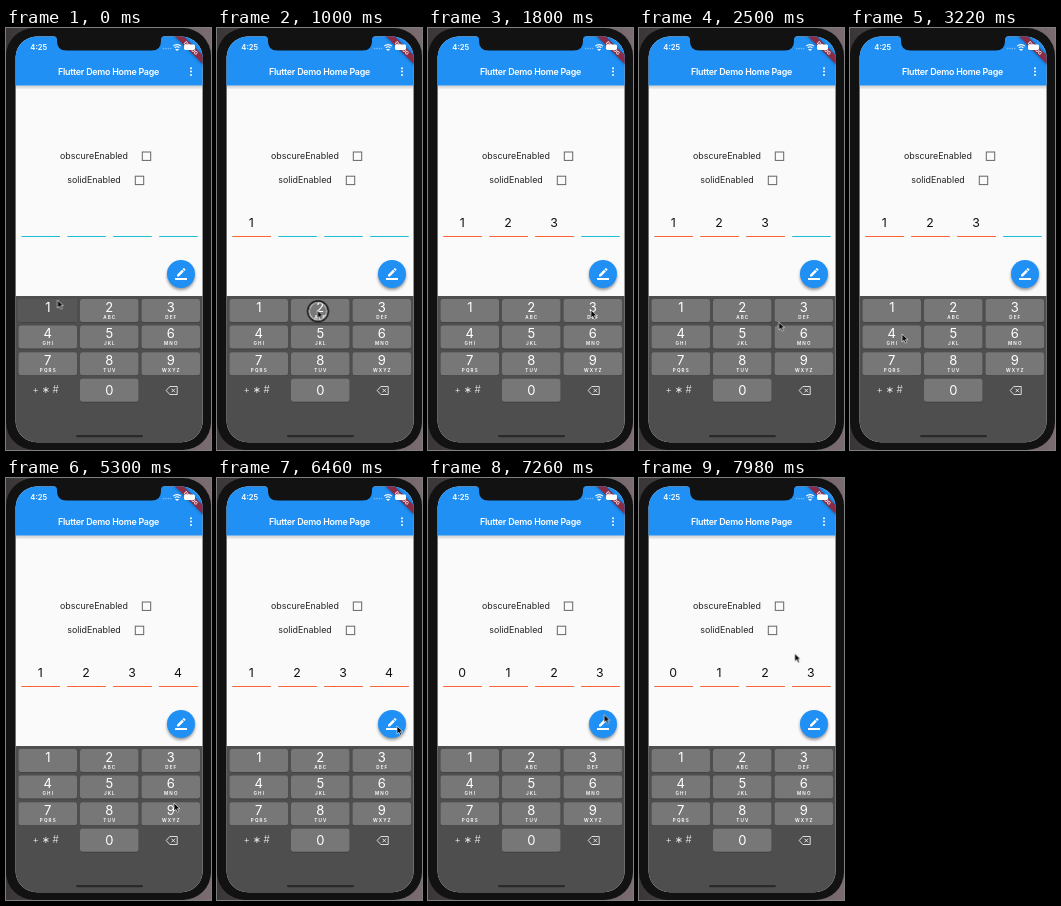
Write an HTML page that moves like this. It is 205x422 px and loops after 8 s.

```html
<!DOCTYPE html>
<html lang="en">
<head>
<meta charset="utf-8">
<title>Pin input demo</title>
<style>
  html, body { margin: 0; width: 100%; height: 100%; overflow: hidden; background: #111; }
  svg { display: block; width: 100vw; height: 100vh; }
  text { font-family: Inter, Roboto, sans-serif; text-anchor: middle; }
  .label { font-size: 8.9px; fill: #222; }
  .digit { font-size: 12.3px; fill: #111; }
  .num { font-size: 13px; fill: #fff; }
  .abc { font-size: 4.6px; font-weight: 600; letter-spacing: 1.1px; fill: #fff; }
  .box { fill: none; stroke: #666; stroke-width: 1; }

  .cell, .press, .old, .new, #ring { animation: 8s step-end infinite; }
  .press { animation-timing-function: linear; }
  #cursor { animation: move 8s ease-in-out infinite; }
  #ring { animation-name: ring; }
  .old { animation-name: old; }
  .new { animation-name: new; }
  #c1 { animation-name: c1; }
  #c2 { animation-name: c2; }
  #c3 { animation-name: c3; }
  #c4 { animation-name: c4; }
  #p1 { animation-name: p1; }
  #p2 { animation-name: p2; }
  #p3 { animation-name: p3; }
  #p4 { animation-name: p4; }

  @keyframes c1 { 0% { opacity: 0 } .5%, 100% { opacity: 1 } }
  @keyframes c2 { 0% { opacity: 0 } 14%, 100% { opacity: 1 } }
  @keyframes c3 { 0% { opacity: 0 } 19.25%, 100% { opacity: 1 } }
  @keyframes c4 { 0% { opacity: 0 } 45%, 100% { opacity: 1 } }
  @keyframes old { 0% { opacity: 1 } 85%, 100% { opacity: 0 } }
  @keyframes new { 0% { opacity: 0 } 85%, 100% { opacity: 1 } }

  @keyframes p1 { 0% { opacity: 1 } 2.5%, 100% { opacity: 0 } }
  @keyframes p2 { 0%, 13.6% { opacity: 0 } 13.7%, 14.2% { opacity: 1 } 16%, 100% { opacity: 0 } }
  @keyframes p3 { 0%, 18.9% { opacity: 0 } 19%, 19.5% { opacity: 1 } 21.5%, 100% { opacity: 0 } }
  @keyframes p4 { 0%, 44.4% { opacity: 0 } 44.5%, 45.2% { opacity: 1 } 47.5%, 100% { opacity: 0 } }

  @keyframes ring {
    0%, 13.9%, 19%, 44.75%, 84.75%, 100% { opacity: 0 }
    11%, 17.25%, 42.25%, 83.25% { opacity: 1 }
  }
  @keyframes move {
    0%, 2.5% { transform: translate(51.5px, 272px) }
    10.5% { transform: translate(98px, 281.5px) }
    12.5%, 14.25% { transform: translate(100.5px, 282.3px) }
    17%, 20.5% { transform: translate(165px, 281px) }
    30% { transform: translate(142.5px, 291.5px); animation-timing-function: linear }
    31.25% { transform: translate(139.7px, 294px) }
    40.5% { transform: translate(52px, 306px) }
    42%, 50% { transform: translate(50px, 307px); animation-timing-function: ease-in }
    57.5% { transform: translate(92px, 318px); animation-timing-function: linear }
    63% { transform: translate(140px, 333px); animation-timing-function: ease-out }
    66.25% { transform: translate(168px, 325px) }
    68% { transform: translate(170px, 322px) }
    77.25%, 88% { transform: translate(180px, 248px) }
    98%, 100% { transform: translate(155.7px, 175.5px) }
  }
</style>
</head>
<body>
<svg viewBox="0 0 205 422" preserveAspectRatio="none">
  <defs>
    <clipPath id="screen"><rect x="9.6" y="8.6" width="187" height="405.6" rx="21"/></clipPath>
    <filter id="soft" x="-50%" y="-50%" width="200%" height="200%"><feGaussianBlur stdDeviation="1.8"/></filter>
    <linearGradient id="desk"><stop stop-color="#3a3637"/><stop offset="1" stop-color="#7a6c70"/></linearGradient>
  </defs>

  <rect width="205" height="422" fill="url(#desk)"/>
  <rect width="205" height="422" rx="28" fill="#121212"/>

  <g clip-path="url(#screen)">
    <rect x="9" y="8" width="188" height="407" fill="#fafafa"/>
    <rect x="9" y="57" width="188" height="2.5" fill="#000" opacity=".22" filter="url(#soft)"/>
    <rect x="9" y="8" width="188" height="49.5" fill="#2090f4"/>
    <text x="102.5" y="47.3" font-size="8.9" font-weight="600" letter-spacing="-.25" fill="#fff">Flutter Demo Home Page</text>
    <g fill="#fff"><circle cx="185" cy="40.2" r="1"/><circle cx="185" cy="43.6" r="1"/><circle cx="185" cy="47" r="1"/></g>
    <g transform="translate(197 8) rotate(45)">
      <rect x="-24" y="14" width="48" height="6.2" fill="#000" opacity=".4" filter="url(#soft)"/>
      <rect x="-24" y="14" width="48" height="6" fill="#8a2c46"/>
      <text y="18.8" font-size="5" font-weight="800" fill="#f0dde2">DEBUG</text>
    </g>

    <text x="32.8" y="21.8" font-size="7.6" font-weight="600" fill="#fff">4:25</text>
    <g fill="#fff" opacity=".4">
      <circle cx="157.6" cy="20.6" r=".8"/><circle cx="160" cy="20.6" r=".8"/>
      <circle cx="162.4" cy="20.6" r=".8"/><circle cx="164.8" cy="20.6" r=".8"/>
    </g>
    <g fill="none" stroke="#fff" stroke-width="1.1">
      <path d="M167.3 18.2a5.4 5.4 0 0 1 7.6 0M168.8 19.9a3.3 3.3 0 0 1 4.6 0"/>
      <path d="M170.3 21.5h1.6l-.8.8z"/>
    </g>
    <rect x="178" y="16.6" width="11" height="5.4" rx="1.4" fill="#fff"/>

    <text class="label" x="88" y="131.2">obscureEnabled</text>
    <rect class="box" x="136.300" y="124" width="8.400" height="8.400"/>
    <text class="label" x="88" y="155.4">solidEnabled</text>
    <rect class="box" x="129.300" y="148.200" width="8.400" height="8.400"/>

    <g id="cells"></g>

    <circle cx="175" cy="248" r="14" fill="#000" opacity=".4" filter="url(#soft)"/>
    <circle cx="175" cy="246" r="14" fill="#2090f4"/>
    <path transform="translate(169 240) scale(.5)" fill="#fff" d="M17.75 7 14 3.25l-10 10V17h3.75zM20.7 4c.4-.4.4-1 0-1.4L18.4.3c-.4-.4-1-.4-1.4 0l-2 2L18.75 6zM0 20h24v4H0z"/>

    <rect x="9" y="268" width="188" height="147" fill="#4e4e4e"/>
    <g id="keys"></g>
    <text x="41" y="365" font-size="9.8" font-weight="300" letter-spacing="2.7" fill="#eee">+∗#</text>
    <g fill="none" stroke="#fff" stroke-width=".8" stroke-linejoin="round">
      <path d="M160.2 362.5l3.6-4h7.4v8h-7.4z"/>
      <path d="M165.5 360.7l3.6 3.6m0-3.6l-3.6 3.6"/>
    </g>
    <rect x="70" y="407" width="67" height="2.2" rx="1.1" fill="#2a2a2a"/>
  </g>
  <path d="M48 8q3 .5 3 3.500v1.700q0 9.300 9.300 9.300h85.400q9.300 0 9.300-9.300v-1.700q0-3 3-3.500z" fill="#121212"/>

  <g id="cursor">
    <g id="ring" fill="none">
      <circle cx=".5" cy="1" r="9" stroke="#fff" stroke-width="1.2" opacity=".85"/>
      <circle cx=".5" cy="1" r="10.200" stroke="#0a0a0a" stroke-width="1.500"/>
    </g>
    <path d="M0 0v8l1.900-1.700 1.300 2.900 1.500-.7-1.300-2.800h2.500z" fill="#0a0a0a" stroke="#fff" stroke-width=".6"/>
  </g>
</svg>
<script>
  const letters = ['', 'ABC', 'DEF', 'GHI', 'JKL', 'MNO', 'PQRS', 'TUV', 'WXYZ'];

  function key(n, col, row) {
    const x = 12.5 + col * 61.5, y = 271 + row * 26.6, mid = x + 29.3;
    const abc = letters[n - 1];
    const rect = (fill, extra = '', dy = 0) =>
      `<rect ${extra} x="${x}" y="${y + dy}" width="58.5" height="23" rx="2.5" fill="${fill}"/>`;
    return rect('#3a3a3a', '', .6) + rect('#777')
      + (n > 0 && n < 5 ? rect('#575757', `class="press" id="p${n}"`) : '')
      + `<text class="num" x="${mid}" y="${y + (n ? 12.5 : 16)}">${n}</text>`
      + (abc ? `<text class="abc" x="${mid + .5}" y="${y + 19.8}">${abc}</text>` : '');
  }

  function cell(i) {
    const x = 15.5 + i * 45.9, mid = x + 18.7;
    const line = color => `<path d="M${x} 208.5h38.5" stroke="${color}" stroke-width="1.1"/>`;
    const digit = (kind, n) => `<text class="digit ${kind}" x="${mid}" y="199.4">${n}</text>`;
    return line('#1cbdd4')
      + `<g class="cell" id="c${i + 1}">${line('#ff6338')}${digit('old', i + 1)}${digit('new', i)}</g>`;
  }

  let pad = key(0, 1, 3);
  for (let n = 1; n < 10; n++) pad += key(n, (n - 1) % 3, Math.floor((n - 1) / 3));
  document.getElementById('keys').innerHTML = pad;
  document.getElementById('cells').innerHTML = [0, 1, 2, 3].map(cell).join('');
</script>
</body>
</html>
```
